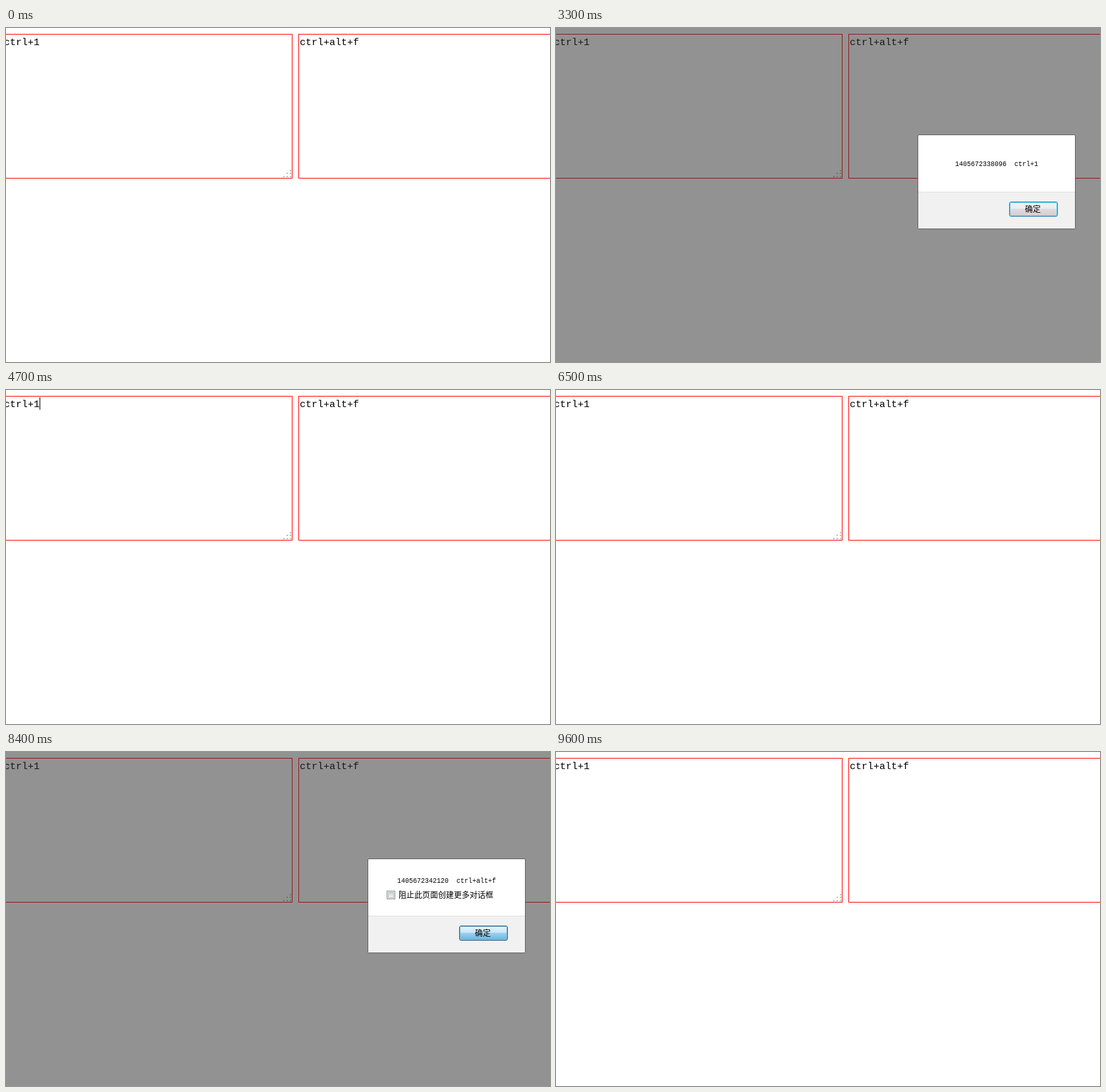
Write an HTML page that moves like this. It is 826 by 508 pixels and loops after 9700 ms.

```html
<!DOCTYPE html>
<html lang="zh-CN">
<head>
<meta charset="utf-8">
<title>Shortcut demo</title>
<style>
  html, body { margin: 0; width: 100%; height: 100%; overflow: hidden; background: #fff; }
  svg { display: block; }
  text { fill: #000; white-space: pre; }
  .field { font: 15px "Liberation Mono", monospace; }
  .message { font: 10px "Liberation Mono", monospace; }
  .label { font: 12px "Noto Sans CJK SC", "Noto Sans CJK", "Noto Sans CJK JP", sans-serif; }
</style>
</head>
<body>
<svg width="826" height="508" viewBox="0 0 826 508">
  <defs id="defs"></defs>
  <rect width="826" height="508" fill="#fff"/>
  <g fill="none" stroke="#f00" shape-rendering="crispEdges">
    <rect x="-9.5" y="9.5" width="444" height="219"/>
    <rect x="444.5" y="9.5" width="444" height="219"/>
  </g>
  <g id="grip" fill="#bdb9b9"></g>
  <text class="field" x="-3" y="26">ctrl+1</text>
  <text class="field" x="446" y="26">ctrl+alt+f</text>
  <rect id="caretLeft" x="51" y="11" width="1" height="19"/>
  <rect id="caretRight" x="536" y="11" width="1" height="19"/>

  <g id="dialog">
    <rect width="826" height="508" fill="#2e2e2e" fill-opacity=".52"/>
    <rect x="549.5" y="162.5" width="239" height="143" rx="1.5" fill="#fff" stroke="#606060"/>
    <path d="M550 249h238v55q0 1-1 1h-236q-1 0-1-1z" fill="#f1f1f1"/>
    <rect x="550" y="249" width="238" height="1" fill="#dfdfdf"/>
    <text id="first" class="message" x="606" y="210">1405672338096&#160;&#160;ctrl+1</text>
    <g id="second">
      <text class="message" x="594" y="199">1405672342120&#160;&#160;ctrl+alt+f</text>
      <rect x="578.5" y="211.5" width="12" height="12" fill="#f4f4f4" stroke="#8e8f8f"/>
      <rect x="580.5" y="213.5" width="8" height="8" fill="url(#check)" stroke="#b4b8bc"/>
      <text class="label" x="596" y="222">阻止此页面创建更多对话框</text>
    </g>
    <rect id="face" x="688.5" y="264.5" width="73" height="22" rx="2.5"/>
    <rect id="rim" x="689.5" y="265.5" width="71" height="20" rx="1.5" fill="none"/>
    <text class="label" x="712" y="280">确定</text>
  </g>
</svg>
<script>
const LOOP = 9700;
const $ = id => document.getElementById(id);

// Button looks: four gradient stops, outer border, inner rim
const looks = {
  focus: { stops: ['#f4f4f4', '#ebebeb', '#dddddd', '#cfcfcf'], border: '#3c7fb1', rim: '#48d0f2' },
  hover: { stops: ['#eaf6fd', '#d9f0fc', '#bee6fd', '#a7d9f5'], border: '#3c7fb1', rim: '#e6f6fd' },
  press: { stops: ['#e5f4fc', '#c4e5f6', '#98d1ef', '#68b3db'], border: '#2c628b', rim: '#86b6d0' }
};

const gradient = (id, colours, offsets) =>
  `<linearGradient id="${id}" x2="0" y2="1">` +
  colours.map((c, i) => `<stop offset="${offsets[i]}" stop-color="${c}"/>`).join('') +
  '</linearGradient>';

$('defs').innerHTML =
  Object.entries(looks).map(([id, look]) => gradient(id, look.stops, [0, .5, .5, 1])).join('') +
  gradient('check', ['#d0d4d8', '#f4f4f4'], [0, 1]);

let dots = '';
for (let row = 0; row < 3; row++)
  for (let col = 2 - row; col < 3; col++)
    dots += `<rect x="${421 + 5 * col}" y="${[216, 220, 225][row]}" width="2" height="2"/>`;
$('grip').innerHTML = dots;

// Each step holds until the next: start time, caret side, dialog, button look
const steps = [
  [0], [2400, 'left'], [2800],
  [3300, '', 'first', 'focus'], [4400, '', 'first', 'hover'], [4600, '', 'first', 'press'],
  [4700, 'left'], [5000, 'right'], [5500], [6000, 'right'], [6500],
  [7000, '', 'second', 'focus'], [8100, '', 'second', 'hover'], [8400, '', 'second', 'press'],
  [8500, 'right'], [9000], [9500, 'right'], [9600]
];

const show = (id, visible) => $(id).setAttribute('display', visible ? 'inline' : 'none');

function render(time) {
  const [, caret, dialog, button] = steps.findLast(step => step[0] <= time);
  show('caretLeft', caret === 'left');
  show('caretRight', caret === 'right');
  show('dialog', dialog);
  show('first', dialog === 'first');
  show('second', dialog === 'second');
  if (button) {
    $('face').setAttribute('fill', `url(#${button})`);
    $('face').setAttribute('stroke', looks[button].border);
    $('rim').setAttribute('stroke', looks[button].rim);
  }
}

const start = performance.now();
function tick() {
  render((performance.now() - start) % LOOP);
  requestAnimationFrame(tick);
}
tick();
</script>
</body>
</html>
```
